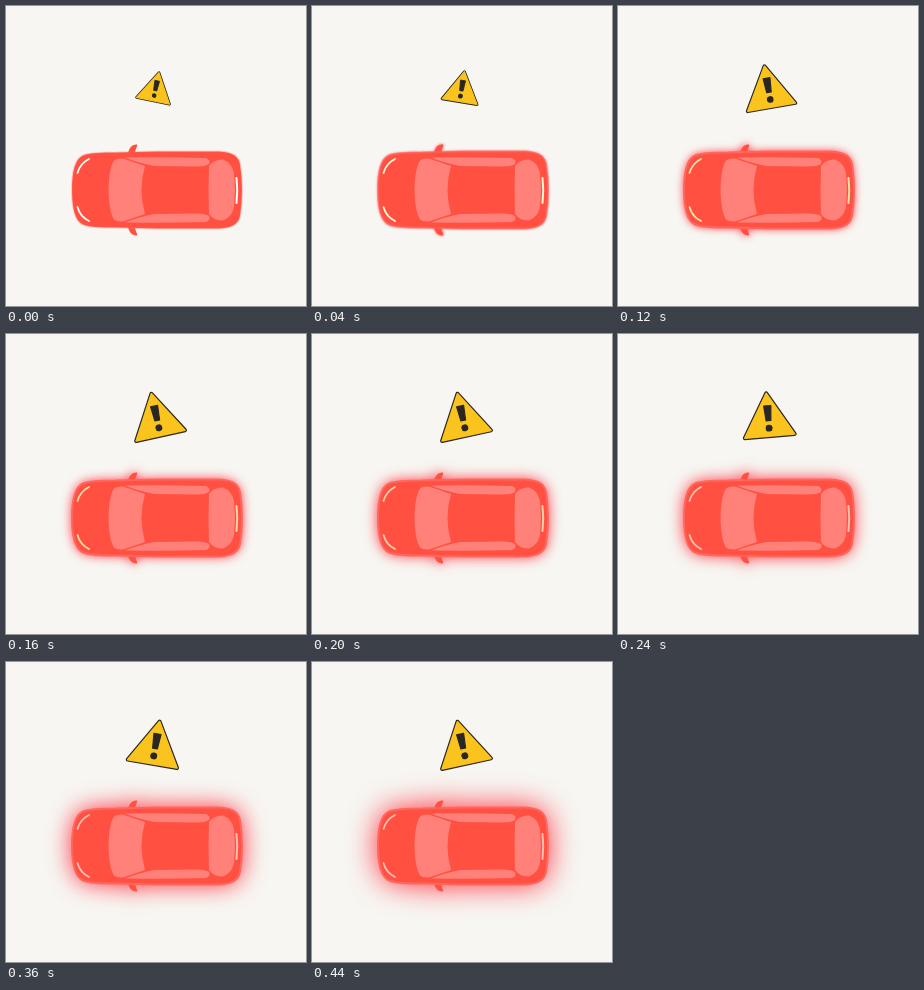
These frames come from a looping animation (300x300 px, 480 ms). An HTML page:

```html
<!DOCTYPE html>
<html lang="en">
<head>
<meta charset="utf-8">
<title>Car warning</title>
<style>
  html, body { margin: 0; width: 100%; height: 100%; overflow: hidden; background: #f7f6f2; }
  svg { display: block; width: 100vw; height: 100vh; }
  .glass { fill: #ff8179; }
  .lamp { fill: none; stroke: #fff; stroke-linecap: round; }
</style>
</head>
<body>
<svg viewBox="0 0 300 300">
  <defs>
    <filter id="soft" filterUnits="userSpaceOnUse" x="0" y="60" width="300" height="240" color-interpolation-filters="sRGB">
      <feGaussianBlur id="blur" stdDeviation="0"/>
    </filter>
    <path id="shell" d="M66 184C66 166 69 153 77 149.500C84 146.500 96 146.500 110 146.500L150 145.500L212 145.500C223 146 232 148 234 158Q236 170 236 184Q236 198 234 210C232 220 223 222 212 222.500L150 222.500L110 221.500C96 221.500 84 221.500 77 218.500C69 215 66 202 66 184Z"/>
    <path id="mirror" d="M122 147.500C123 142 126 138 131 138.500C132 140 129 143 129 147.500Z"/>
    <g id="half">
      <path class="glass" d="M117 152.500L139 160Q135.500 172 135.500 184L102.500 184Q103 162 108 154.500Q111 152 117 152.500Z"/>
      <path class="glass" d="M119 151.500Q160 151 200 152Q205 154 203 158Q200 160.500 190 160.500L148 160Q132 157 119 151.500Z"/>
      <path class="glass" d="M202.500 184L203 160Q208 153 217 153.500Q226 157 228 167L229 184Z"/>
      <path class="lamp" stroke-width="1.800" d="M71.500 167Q74 157.500 83 153"/>
    </g>
    <g id="outline">
      <use href="#shell"/>
      <use href="#mirror"/>
      <use href="#mirror" transform="matrix(1 0 0 -1 0 368)"/>
    </g>
  </defs>

  <g id="glow" filter="url(#soft)"><use href="#outline" fill="#ff2434"/></g>
  <use href="#outline" fill="#ff5041"/>
  <use id="rim" href="#shell" fill="none" stroke="#ff665e" stroke-width="2"/>
  <use href="#half"/>
  <use href="#half" transform="matrix(1 0 0 -1 0 368)"/>
  <path class="lamp" stroke-width="2" d="M230.500 172Q232 184 230.500 197"/>

  <g id="sign">
    <path d="M0 -18L21 18H-21Z" fill="#fbc31d" stroke="#292723" stroke-width="3.400" stroke-linejoin="round"/>
    <path d="M0 -18L21 18H-21Z" fill="#fbc31d" stroke="#fbc31d" stroke-width="1.400" stroke-linejoin="round"/>
    <path d="M-3 -7.500H3L2 5H-2Z" fill="#292723" stroke="#292723" stroke-linejoin="round"/>
    <circle cy="11.300" r="2.900" fill="#292723"/>
  </g>
</svg>
<script>
const LOOP = 480, STEP = 40;
const $ = id => document.getElementById(id);
const lamps = document.querySelectorAll('.lamp');
const swings = [
  { from: -20, to: 180, turn: [12, -12.5], size: [0.8, 1.19] },
  { from: 180, to: 320, turn: [-12.5, 12], size: [1.19, 1.19] },
  { from: 320, to: 460, turn: [12, -12.5], size: [1.19, 1.19] }
];
const lampTones = [[255, 255, 255], [255, 240, 165], [255, 215, 165], [255, 195, 175], [255, 190, 182]];

const mix = (a, b, p) => a + (b - a) * p;
const ease = p => p < 0.5 ? 4 * p ** 3 : 1 - 4 * (1 - p) ** 3;

function lampColor(t) {
  const at = Math.min(t / 80, lampTones.length - 1.001);
  const i = Math.floor(at);
  return `rgb(${lampTones[i].map((c, k) => Math.round(mix(c, lampTones[i + 1][k], at - i)))})`;
}

function draw(t) {
  const s = swings.find(s => t < s.to) || swings[2];
  const p = ease(Math.min(1, (t - s.from) / (s.to - s.from)));
  $('sign').setAttribute('transform',
    `translate(150 80.700) rotate(${mix(...s.turn, p)}) scale(${mix(...s.size, p)})`);

  $('blur').setAttribute('stdDeviation', t * 0.034);
  $('glow').setAttribute('opacity', t ? 1 : 0);
  $('rim').setAttribute('opacity', Math.min(1, 0.3 + t / 120));
  const color = lampColor(t);
  lamps.forEach(l => { l.style.stroke = color; });
}

function tick() {
  draw(Math.floor(performance.now() % LOOP / STEP) * STEP);
  requestAnimationFrame(tick);
}
tick();
</script>
</body>
</html>
```
